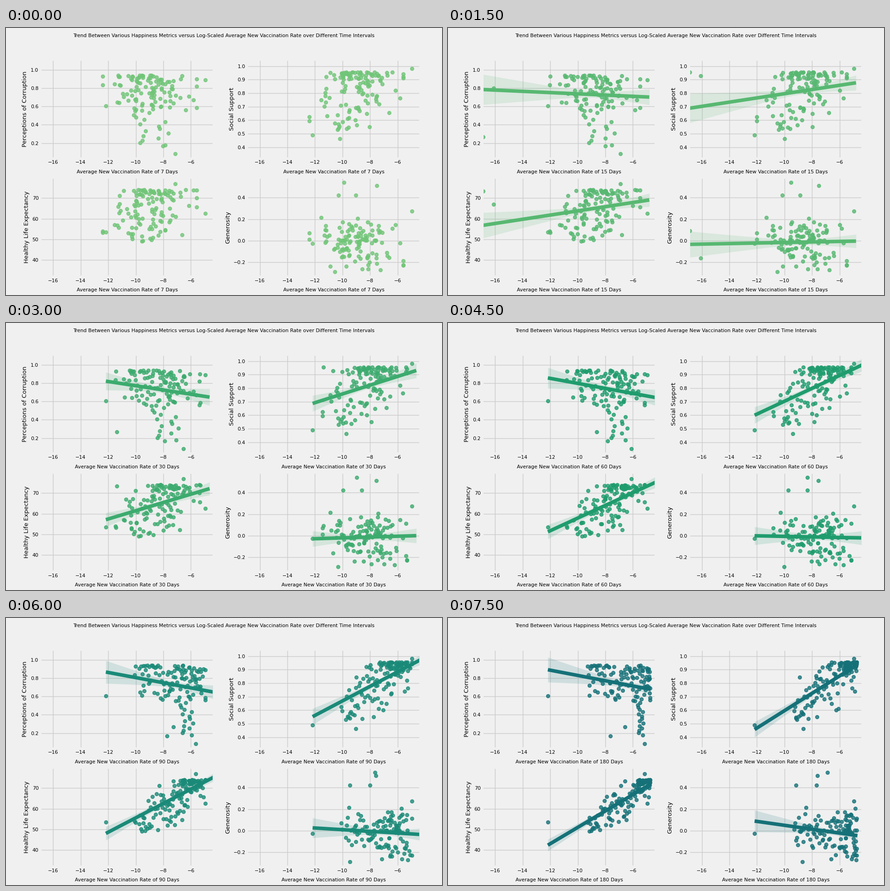
A matplotlib script that plays this animation: 956x586 px, repeating every 8 s.

```python
import numpy as np
import matplotlib.pyplot as plt
from matplotlib.animation import FuncAnimation

W, H, DPI = 956, 586, 72  # at 72 dpi one point is one pixel
BACK, GRID = "#f0f0f0", "#cbcbcb"
SMALL, LARGE = 10.86, 13
XLIM = (-16.835, -4.425)
DAYS = [7, 15, 30, 60, 90, 180]
COLORS = ["#70c577", "#57b871", "#3cab6e", "#1f9c6e", "#1a8a78", "#157178"]

plt.rcParams["font.family"] = "DejaVu Sans"
rng = np.random.default_rng(11)

# Notable countries: first x, last x, then the four metrics
NOTABLE = np.array([
    (-12.17, -12.17, .607, .49, 53.4, -.024),
    (-4.95, -4.95, .888, .983, 62.5, .273),
    (-7.15, -5.15, .082, .915, 76.95, -.018),
    (-8.03, -7.65, .167, .552, 61.4, .061),
    (-9.9, -6.88, .867, .811, 62.2, .542),
    (-7.51, -7.6, .66, .78, 59.3, .509),
    (-10.29, -9.17, .721, .54, 55.7, .422),
    (-9.03, -7.67, .746, .693, 55, .422),
    (-10.2, -8.63, .924, .463, 52.5, -.102),
])

# Late starters: distance still to go at 15 days, goal, then the metrics
LATE = np.array([
    (10.97, -5.9, .27, .954, 73.3, .093),
    (10.8, -5.3, .8, .927, 67.1, -.162),
])

# Right end of the regression lines, from 15 days on
FIT_RIGHT = [-4.81, -4.645, -4.35, -4.35, -4.71]


def skewed(z, top, span, power=1.5):
    """Spread values by rank, crowded near the top."""
    p = z.argsort().argsort() / (len(z) - 1)
    return top - span * (1 - p) ** power


def mix(a, b, corr):
    return corr * a + np.sqrt(1 - corr ** 2) * b


def build_data(n=102, m=15):
    """Return x for each interval and y for each metric."""
    wealth, drift, *noise = rng.normal(size=(6, n))
    cloud = [
        skewed(mix(wealth, noise[0], -.2), .94, .39),
        skewed(mix(wealth, noise[1], .84), .955, .425, 2),
        skewed(mix(wealth, noise[2], .94), 74, 25),
        np.clip(-.03 + .12 * mix(wealth, noise[3], -.2), -.288, .31),
    ]
    # wealthy countries with low corruption drift together
    clean = [np.linspace(.18, .53, m), rng.uniform(.90, .955, m),
             rng.uniform(71.8, 74.3, m), rng.uniform(-.1, .18, m)]
    offset = rng.uniform(-1.4, 1.4, m)
    ys = [np.concatenate([cloud[i], clean[i], NOTABLE[:, 2 + i], LATE[:, 2 + i]])
          for i in range(4)]

    xs = []
    for k in range(len(DAYS)):
        t = k / (len(DAYS) - 1)
        grow = t ** 1.3
        z = np.clip(mix(wealth, drift, .2 + .75 * t), -2.2, 2.2)
        early, late = -9 + 1.55 * z, skewed(z, -4.75, 4.55)
        xs.append(np.concatenate([
            early + (late - early) * grow,
            -8.9 + 3.45 * grow + offset * (1 - .85 * grow),
            NOTABLE[:, 0] + (NOTABLE[:, 1] - NOTABLE[:, 0]) * grow,
            LATE[:, 1] - LATE[:, 0] * .5 ** (k - 1),
        ]))
    return xs, ys


XS, YS = build_data()

fig = plt.figure(figsize=(W / DPI, H / DPI), dpi=DPI, facecolor=BACK)


def put_text(x, y, text, size=SMALL, rotation=0):
    return fig.text(x / W, 1 - y / H, text, fontsize=size, rotation=rotation,
                    ha="center", va="baseline", rotation_mode="anchor")


def number(spec):
    return lambda v, _: format(v, spec).replace("-", "\u2212")


class Panel:
    def __init__(self, y, left, top, ylim, ticks, spec, label, label_x, starts, ends):
        self.y, self.starts, self.ends = y, starts, ends
        w, h = 375, 212
        ax = fig.add_axes([left / W, 1 - (top + h) / H, w / W, h / H],
                          facecolor=BACK)
        ax.set(xlim=XLIM, ylim=ylim, xticks=range(-16, -5, 2), yticks=ticks)
        ax.yaxis.set_major_formatter(number(spec))
        ax.tick_params(length=0, pad=6.5, labelsize=SMALL)
        ax.set_axisbelow(True)
        ax.grid(color=GRID, lw=1.4)
        for spine in ax.spines.values():
            spine.set_visible(False)
        put_text(label_x, top + h / 2, label, LARGE, 90)
        self.xlabel = put_text(left + w / 2, top + h + 35, "")
        self.dots = ax.scatter(y * 0, y, s=7.8 ** 2, alpha=.8, lw=1.3, zorder=1)
        self.band = ax.fill_between([0, 1], 0, 0, alpha=.15, lw=0, zorder=1.5)
        self.line, = ax.plot([], [], lw=7.8, solid_capstyle="butt", zorder=2)

    def show(self, k):
        color = COLORS[k]
        self.xlabel.set_text(f"Average New Vaccination Rate of {DAYS[k]} Days")
        self.dots.set_offsets(np.column_stack([XS[k], self.y]))
        self.dots.set_color(color)
        for part in (self.line, self.band):
            part.set_visible(k > 0)
            part.set_color(color)
        if k > 0:
            self.show_fit(XS[k], FIT_RIGHT[k - 1], self.starts[k - 1], self.ends[k - 1])

    def show_fit(self, data, x1, y0, y1):
        """Line with its 95 % confidence band."""
        x0 = data.min()
        slope = (y1 - y0) / (x1 - x0)
        error = np.std(self.y - y0 - slope * (data - x0))
        x = np.linspace(x0, x1, 100)
        y = y0 + slope * (x - x0)
        far = (x - data.mean()) / data.std()
        half = 1.96 * error * np.sqrt((1 + far ** 2) / len(data))
        edge = np.r_[y + half, (y - half)[::-1]]
        self.band.set_verts([np.column_stack([np.r_[x, x[::-1]], edge])])
        self.line.set_data([x0, x1], [y0, y1])


panels = [
    Panel(YS[0], 78, 72, (.044, 1.0974), np.arange(.2, 1.1, .2), ".1f",
          "Perceptions of Corruption", 45.5,
          [.784, .821, .856, .866, .891], [.702, .647, .642, .647, .677]),
    Panel(YS[1], 531.3, 72, (.3244, 1.0397), np.arange(.4, 1.05, .1), ".1f",
          "Social Support", 499,
          [.689, .687, .6, .552, .457], [.877, .931, .973, .973, .937]),
    Panel(YS[2], 78, 331, (32.453, 79.387), range(40, 71, 10), ".0f",
          "Healthy Life Expectancy", 49,
          [56.8, 57.1, 51.2, 48, 42.3], [69.1, 72.2, 75.3, 75.3, 72]),
    Panel(YS[3], 531.3, 331, (-.3211, .5744), [-.2, 0, .2, .4], ".1f",
          "Generosity", 490,
          [-.033, -.028, 0, .027, .09], [-.003, .001, -.02, -.034, -.045]),
]
put_text(W / 2, 20, "Trend Between Various Happiness Metrics versus Log-Scaled "
         "Average New Vaccination Rate over Different Time Intervals")


def update(i):
    for panel in panels:
        panel.show(i // 3)  # each interval holds for three ticks
    return []


anim = FuncAnimation(fig, update, frames=16, interval=500, repeat=True,
                     repeat_delay=0, init_func=lambda: update(0))
plt.show()
```
